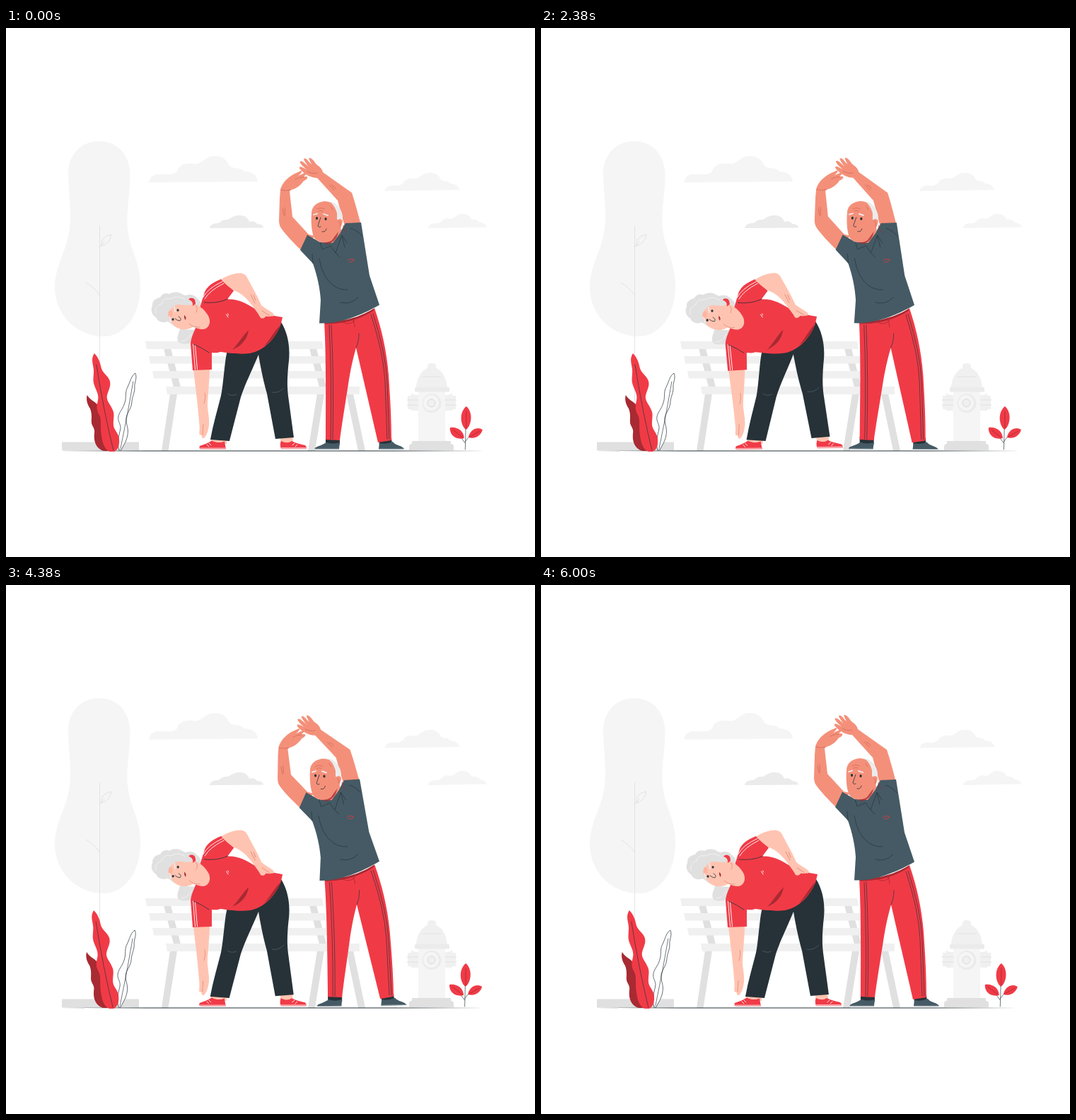
An HTML page that plays this animation: 748 px wide and 748 px high, repeating every 6.04 s.

```html
<!DOCTYPE html>
<html lang="en">
<head>
<meta charset="utf-8">
<title>Stretching in the park</title>
<style>
html, body { margin: 0; width: 100%; height: 100%; overflow: hidden; background: #fff; }
svg { display: block; width: 100%; height: 100%; }
.pale { fill: #f5f5f5; } .mist { fill: #f0f0f0; } .soft { fill: #ebebeb; } .grey { fill: #e0e0e0; }
.red { fill: #f03b47; } .wine { fill: #a82a32; } .dark { fill: #263238; } .slate { fill: #455a64; }
.rose { fill: #ffc4b1; } .tan { fill: #f4907a; } .sole { fill: #f9a4a9; }
.ink, .thin, .white, .faint, .crease, .fold { fill: none; stroke-linecap: round; stroke-linejoin: round; }
.ink { stroke: #263238; stroke-width: .8; }
.thin { stroke: #263238; stroke-width: .65; }
.white { stroke: #fff; stroke-width: .9; }
.faint { stroke: #e0e0e0; stroke-width: .9; }
.crease { stroke: #c96553; stroke-width: .7; }
.fold { stroke: #a82a32; stroke-width: .8; }
</style>
</head>
<body>
<svg viewBox="0 0 748 748" xmlns="http://www.w3.org/2000/svg">
  <g id="tree">
    <path class="pale" d="M88 206C88 178 107 160 132 160C157 160 175 179 175.500 207C176 236 168 262 173 291C177 316 190 332 190 365C190 406 168 436 138 436C100 436 69 406 69 366C69 338 84 318 89 290C94 262 88 232 88 206Z"/>
    <path class="faint" d="M132.500 280V586M132.500 378Q124 366 113 360M132.500 310L139 302M135 308Q133 295 149 292Q147 305 135 308Z"/>
  </g>
  <g id="clouds">
    <path class="pale" d="M202 218.500C204 208 212 206 221 207C228 207 236 208 242 203C243 194 255 190 267 192C275 194 281 182 293 181C306 180 312 186 316 195C322 200 331 196 337 203C349 203 355 209 356 217Z"/>
    <path class="soft" d="M288 283C289 278 293 276 300 276C303 275 305 271 311 271C316 272 320 264 331 265C339 265 343 270 344 274C349 272 354 275 355 277C361 277 364 280 364 282.500Z"/>
    <path class="pale" d="M535.500 230.500C537 224 542 222 551 223C557 223 559 221 562 219C563 214 571 212 579 213C585 213 588 205 598 205C607 204 613 209 615 215C620 217 625 215 628 220C636 220 640 224 641.500 229Z"/>
    <path class="pale" d="M596.500 283C598 277 603 276 610 276C613 276 616 273 619 270C624 268 629 271 633 269C637 264 642 262 647 263C654 263 657 268 659 271C664 270 668 272 670 275C675 275 679 278 680 281.500Z"/>
  </g>
  <g id="bench">
    <path class="grey" d="M223 453H233L247 508H237ZM429 453H439L453 508H443ZM232 517H242L229.500 598H220ZM440 517H450L437 598H427ZM481 517H491L508 598H498Z"/>
    <path class="mist" d="M197 443H447L449 454H199ZM202 464H451L453 474.500H204ZM207 485H456L458 495.500H209ZM226 507H500V518H228Z"/>
  </g>
  <rect class="grey" x="79" y="585.500" width="109" height="12"/>
  <g id="hydrant">
    <path class="grey" d="M570 597V592Q570 588 574 588V584H629V588Q633 588 633 592V597Z"/>
    <path class="mist" d="M580 510C580 495 589 483 596 481V477Q597 474 602 474Q607 474 608 477V481C615 483 624 495 624 510ZM568 520H573V515Q573 519 583 519V541H573V539H568ZM636 520H631V515Q631 519 621 519V541H631V539H636Z"/>
    <path class="pale" d="M583 514H621V584H583Z"/>
    <rect class="soft" x="578" y="508" width="49" height="6.500" rx="1.500"/>
    <path class="faint" d="M589 493H615M567 526H583M567 533H583M621 526H637M621 533H637"/>
    <circle class="soft" cx="602" cy="530.500" r="13.500"/>
    <circle class="pale" cx="601" cy="530" r="11"/>
    <circle cx="601.500" cy="530.300" r="5.500" fill="#f0f0f0" stroke="#d8d8d8"/>
  </g>
  <path class="dark" d="M74 598L200 597.500H550L680 598L550 598.400H200Z"/>

  <g id="plants">
    <path d="M183 488C177 492 176 500 172 508C168 515 171 522 168 530C166 538 160 543 159 550C158 557 163 560 162 567C160 576 157 585 160 597H163C166 590 170 586 172 576C174 565 170 562 170 553C170 545 177 540 178 530C178 522 183 515 182 507C182 500 186 495 183 488Z" fill="#fff" stroke="#263238" stroke-width=".7"/>
    <path class="thin" d="M180 500Q172 548 162 595"/>
    <path class="wine" d="M115 519C113 525 115 532 119 538C122 545 121 552 121 557C121 563 127 566 125 574C124 585 128 595 138 598H148C140 590 135 580 136 572C138 563 137 556 134 549C130 543 133 537 129 532C124 527 119 526 115 519Z"/>
    <path class="fold" d="M118 528Q126 565 143 596" opacity=".8"/>
    <path class="red" d="M125 460C120 468 123 474 124 482C125 490 122 497 125 505C128 514 132 518 130 527C128 536 128 540 132 547C136 555 133 565 135 575C136 585 139 596 147 599H153C159 596 161 590 160 580C159 572 152 568 152 560C152 551 154 546 151 540C148 532 142 528 143 520C145 511 149 507 147 499C144 491 137 488 135 481C133 472 131 466 125 460Z"/>
    <path class="thin" d="M128 476Q139 545 152 597"/>
    <path class="thin" d="M649.500 596Q650 580 650.500 553M649.500 587Q645 579 637 574M649.500 585Q655 576 663 573"/>
    <path class="red" d="M651 535C641 543 642 561 650.500 568C659 562 661 543 651 535ZM628 565C627 575 636 583 648 580C648 570 638 563 628 565ZM674 568C668 563 656 567 654 579C664 582 672 576 674 568Z"/>
    <path class="fold" d="M651 542V566M632 568L646 579M670 570L656 578"/>
  </g>

  <g id="woman">
    <path class="rose" d="M290 577H312V588H291ZM387 575H405L406 588H389Z"/>
    <path class="dark" d="M313 456L356 455L389 416C398 430 402 450 400 470C398 488 397 505 399 520L407 579L381 581L369 517C364 500 360 480 357 462C347 486 337 506 332 522L316 584L289 582C293 560 299 540 304 520C308 500 309 470 313 456Z"/>
    <path d="M313 517Q319 521 326 518M376 515Q385 517 393 509" fill="none" stroke="#55646b" stroke-width=".7"/>
    <path class="red" d="M274 591C281 589 287 586 291 583.500C298 587 304 586.500 309 584.500L311 595H274Q273 593 274 591ZM389 584C395 587 400 587 404 584C411 587.500 417 588.500 423 590Q425.500 592 425 594H388.500Q387 588 389 584Z"/>
    <path class="sole" d="M274 593.500H311V596H275ZM388.500 593H425V595.500H389Z"/>
    <path class="white" d="M287 587L290 590M284 589L287 592M408 587L405 590M412 589L409 592" stroke-width=".7"/>
    <path class="rose" d="M265 482H288C288 500 285 520 285 535C286 545 288 556 287 562C286 570 284 576 280 580C277 581 277 577 276 575C274 577 273 575 273.500 571C274 565 273.500 561 273 556C271 530 268 510 265 482Z"/>
    <path class="crease" d="M279 560L278 575M281 516Q283 522 280 531" opacity=".7"/>
    <path class="grey" d="M246 425C254 427 262 426 268 427C265 434 266 442 261 445C256 448 245 447 243 443C241 437 244 433 246 425Z"/>
    <path class="red" d="M276 389L281 373C285 365 292 360 304 355L322 371.500L313 383.500C330 383 340 390 352 397C365 405 380 407 391 409L388 421C380 440 365 456 345 460C330 462 312 459 303 458C298 460 294 459 291 459V483L264 484L261 446C262 436 266 430 268 424C272 412 272 400 276 389Z"/>
    <path class="wine" d="M343 427C341 440 334 449 320 455C329 446 334 436 343 427ZM388 420C384 432 376 442 365 450C373 441 379 429 388 420Z"/>
    <path class="ink" d="M280 388Q298 390 313 383.500M265 447Q277 452 287 459" stroke-width=".7"/>
    <path class="white" d="M278.500 381Q285 368 306 358.500M281 383Q288 371 308 361M264.500 447L267.500 483M267.500 449L270.500 483"/>
    <path class="white" d="M311.500 405L314 409M313.500 404L314.500 406" stroke-width="1.500"/>
    <path class="rose" d="M304 355.500C313 350 322 347 331 346.500C336 347 339 349 341 353C348 366 356 380 361 392C367 397 374 400 378 404C380 407 378 408 375 407.500C372 409 369 407 367 408C365 411 362 411 360 410C357 404 354 401 350 395C342 384 334 375 322 371C316 367 310 362 304 355.500Z"/>
    <path class="crease" d="M346 377Q350 385 352 389M350 378L353 385M362 400L373 407" opacity=".8"/>
    <path class="grey" d="M254 378Q264 375 270 382Q278 388 274 394L260 396Z"/>
    <path class="rose" d="M256 391C268 386 281 397 287 409C290 418 286 425 279 426C273 426 268 424 263 422L250 412Z"/>
    <path class="rose" d="M228 405C229 396 238 389 249 389.500C262 391 272 399 272 409L264 423C257 427 247 428 239 422C232 418 228 412 228 405Z"/>
    <path class="grey" d="M240 423C234 419 231 416 228 415C222 418 214 415 212 409C206 406 204 398 207 393C206 386 212 382 218 381C220 376 226 374 231 376C237 372 246 373 250 377C256 378 259 382 258 386L263 391C256 394 246 389 239 392C233 396 230 401 229 406C230 413 234 417 240 423Z"/>
    <path d="M212 404Q209 394 220 390Q222 381 233 383Q243 377 254 384M247 443Q257 443 262 432" fill="none" stroke="#f3f3f3" stroke-width=".9"/>
    <path class="red" d="M260 382Q268 380 268 390L264 393Q265 386 258 384Z"/>
    <ellipse cx="232.500" cy="404" rx="3" ry="5" fill="#ffad96" opacity=".7"/>
    <path class="ink" d="M244 408Q249 411 246 414Q242 414 239 411" stroke-width=".8"/>
    <ellipse class="dark" cx="236" cy="412" rx="1.600" ry="1.800"/>
    <ellipse class="dark" cx="243" cy="399" rx="1.600" ry="1.800"/>
    <path d="M231 408L233 415M238 394L239 401" stroke="#eee" stroke-width="1.600" stroke-linecap="round"/>
    <path class="wine" d="M252 406Q256 409 253.500 413Q251.500 410 252 406Z"/>
    <path class="crease" d="M259 418Q265 424 274 423M268 392Q272 396 269 402" opacity=".7"/>
  </g>

  <g id="man">
    <path class="dark" d="M452 578H472V589H452ZM527 580L545 579L546 589L528 590Z"/>
    <path class="slate" d="M453 586Q462 589 472 586L471 595.500H437C435 592 444 592 453 586ZM528 587Q538 589 547 585C551 591 561 590 563 595.500H527Z"/>
    <path d="M437 595H471M527 595H563" fill="none" stroke="#8b999f" stroke-width=".8"/>
    <path class="red" d="M450 414C470 420 500 410 521 396C531 425 538 455 541 490C543 520 545 550 545 583L526 586L495 452C490 470 488 480 485 497C480 530 475 560 472 583L452 582C452 530 453 470 450 414Z"/>
    <path class="wine" d="M451 415Q488 416 520 397V399.500Q490 419 451 418.500Z"/>
    <path class="thin" d="M457 420Q461 500 459 581M460 420Q464 500 462 581M519 404Q537 460 539 500L542 581M516 405Q534 460 536 500L539 581M495 452Q499 444 499 432"/>
    <path class="fold" d="M476 416Q484 421 493 414Q488 410 476 416M491 415Q494 420 493 423"/>
    <path class="tan" d="M437 294L417 314C406 303 396 293 389 283Q386 279 386 272L387 240L388 228C391 219 397 212 408 206L417 202C420 202 417 206 413 209L422 205C426 204 425 207 421 210L425 210C428 211 425 215 421 216C417 222 411 227 403 229L401 231L405 267L428 292Z"/>
    <path class="tan" d="M479 281L469 244L440 212C432 212 424 208 417 201C413 197 415 195 419 197L425 200C420 196 416 192 415.500 189C417 187 420 189 422 191L428 196C424 191 421 187 421 185C423 183.500 426 186 428 189L432 193C430 188 427 185 429 183.500C433 184 436 189 439 193C445 197 447 200 448 204L489 233C494 248 498 264 502 279Z"/>
    <path class="crease" d="M391 256L393 265M394 254Q395 260 394 266M389 229Q395 231 402 229M457 222L464 229M460 222Q465 224 466 227M409 214Q417 210 421 211M426 203Q433 207 440 205"/>
    <path class="slate" d="M426 292.500L416 314L434 333C440 350 444 368 445 385L443 417.500C470 419 503 406 528 391.500L514 350L502 275L480 276L472 290L444 303Z"/>
    <path class="tan" d="M461 284L473 278L474 288L462 304L445 303Z"/>
    <path class="wine" d="M446 302Q460 303 470 287Q468 302 454 306Z" opacity=".75"/>
    <path class="tan" d="M432 262C432 252 440 246 450 245C461 245 470 252 474 263C477 274 474 284 469 289L461 300C452 306 440 303 436 297C432 289 431 275 432 262Z"/>
    <path d="M457 245C467 246 475 256 476 267C476 273 474 275 471 275L468 270L468 262C466 255 463 249 457 245Z" fill="#ececec"/>
    <path class="tan" d="M467 273Q473 267 476 273Q475 283 468 284Z"/>
    <path class="crease" d="M440 256Q445 253 450 256M442 259Q445 257 448 259M470 274Q474 272 472 280M459 252L462 257"/>
    <path d="M435 264L440 262.500M449 263L455 265" stroke="#f2f2f2" stroke-width="1.800" stroke-linecap="round"/>
    <ellipse class="dark" cx="439.500" cy="269" rx="1.600" ry="2"/>
    <ellipse class="dark" cx="452" cy="270" rx="1.600" ry="2"/>
    <path class="ink" d="M445 268Q442 276 441 280Q443 283 445 281M447 288Q452 289 453 284"/>
    <path class="slate" d="M444 303Q456 308 464 303Q471 296 474 287L481 276L483 304L475 294L466 318L459 308L447 313Z"/>
    <path class="thin" d="M444 303L447 313L459 308L466 318L475 293L482 304M466 318L472 324M475 294L479 310"/>
    <path class="fold" d="M477 279Q476 285 482 289" stroke-width="1.300"/>
    <path class="thin" d="M443 326Q447 353 464 365Q474 371 483 370M473 388Q487 392 498 381M434 333L433 320M487 283Q497 286 503 294"/>
    <path d="M483 329Q487 325 493 328M485 331Q489 332 493 328" fill="none" stroke="#d63a45" stroke-width=".9"/>
  </g>
</svg>
<script>
const LOOP = 6040, FPS = 24, LAST = 144;
const part = id => document.getElementById(id);
const woman = part('woman'), man = part('man'), plants = part('plants');

// Sideways positions at every tenth of the shake.
const SHAKE = [0, -1, 2, -4, 4, -4, 4, -4, 2, -1, 0];
function shake(seconds) {
  const pos = seconds / 1.5 % 1 * 10, i = Math.floor(pos);
  return 1.3 * (SHAKE[i] + (SHAKE[i + 1] - SHAKE[i]) * (pos - i));
}

// Linear sway in degrees: 0, +1, -1, 0.
function sway(seconds, period) {
  const p = seconds / period % 1;
  return p < .25 ? 4 * p : p < .75 ? 2 - 4 * p : 4 * p - 4;
}

function render(ms) {
  // Frames start on whole hundredths of a second and show the middle of their interval.
  const frame = Math.min(LAST, Math.floor((ms % LOOP + 5) * FPS / 1000));
  const s = (frame + .5) / FPS;
  plants.setAttribute('transform', `translate(${shake(s)} 0)`);
  woman.setAttribute('transform', `rotate(${sway(s, 3)} 315 472)`);
  man.setAttribute('transform', `rotate(${sway(s, 6)} 475 391)`);
}

const start = performance.now();
function tick() {
  render(performance.now() - start);
  requestAnimationFrame(tick);
}
tick();
</script>
</body>
</html>
```
